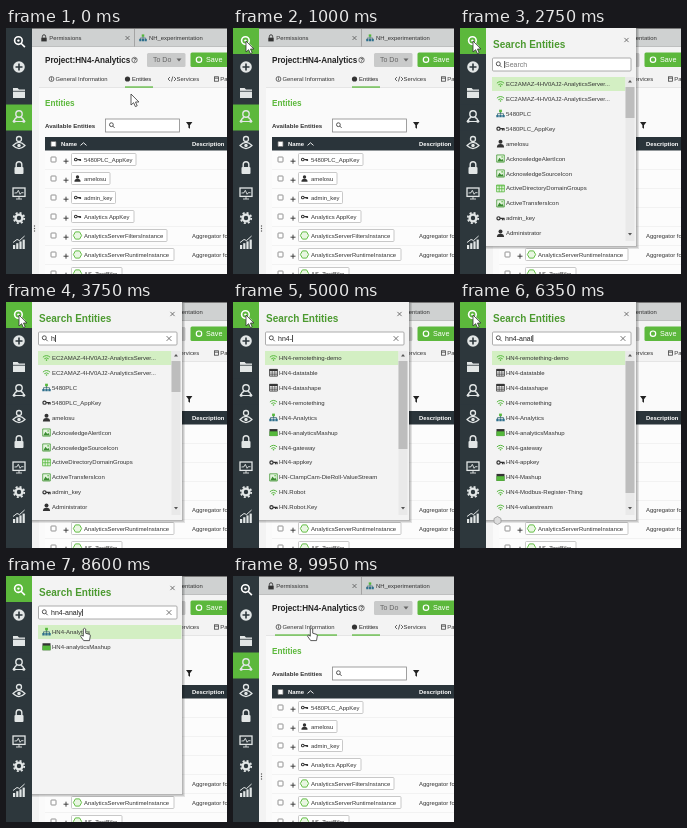
An HTML page that plays this animation: 221 by 246 pixels, repeating every 10000 ms.

```html
<!DOCTYPE html>
<html lang="en">
<head>
<meta charset="utf-8">
<title>Search entities</title>
<style>
html, body { margin: 0; width: 100%; height: 100%; overflow: hidden; background: #f3f3f3; }
svg { display: block; width: 100vw; height: 100vh; }
text { font-family: "Liberation Sans", Arial, sans-serif; font-size: 5.9px; fill: #333; white-space: pre; }
.b { font-weight: bold; }
</style>
</head>
<body>
<svg id="stage" viewBox="0 0 221 246">
  <defs>
    <g id="wifi" fill="none" stroke="#55b83c" stroke-width="1">
      <path d="M-3.6-.6Q0-3.8 3.6-.6M-2.2 1Q0-.8 2.2 1"/><circle cy="2.3" r=".8" fill="#55b83c" stroke="none"/>
    </g>
    <g id="tree">
      <path d="M0-2V1M-3 2V0H3V2" fill="none" stroke="#3c6a74" stroke-width=".8"/>
      <path d="M-1.4-4h2.8v2.6h-2.8z" fill="#55b83c"/>
      <path d="M-4.2 1.2h2.4v2.4h-2.4zM-1.2 1.2h2.4v2.4h-2.4zM1.8 1.2h2.4v2.4h-2.4z" fill="#2e6f8c"/>
    </g>
    <g id="key" fill="none" stroke="#333" stroke-width="1.2">
      <circle cx="-2" r="1.6"/><path d="M-.4 0H4M2 0V1.8M3.6 0V1.8"/>
    </g>
    <g id="lock">
      <path d="M-3-.4h6v4.2h-6z" fill="#333"/><path d="M-1.8-.4v-1.4a1.8 1.8 0 0 1 3.6 0v1.4" fill="none" stroke="#333"/>
    </g>
    <g id="user" fill="#333">
      <circle cy="-1.8" r="2"/><path d="M-3.6 3.8Q-3.6.4 0 .4T3.6 3.8z"/>
    </g>
    <g id="image">
      <path d="M-3.8-3.6h7.6v7.2h-7.6z" fill="#e5f4df" stroke="#479b38" stroke-width=".8"/>
      <path d="M-3.2 3L-1-.8.8 1.4 1.8.2 3.3 3z" fill="#3c8c32"/><circle cx="1.6" cy="-1.6" r=".8" fill="#55b83c"/>
    </g>
    <g id="grid" stroke="#55b83c" stroke-width=".8">
      <path d="M-3.9-3.4h7.8v6.8h-7.8z" fill="#e5f4df"/><path d="M-3.9-2.6h7.8M-3.9.3h7.8M-1.3-3v6.4M1.3-3v6.4"/>
    </g>
    <g id="table">
      <path d="M-3.9-3.4h7.8v6.8h-7.8z" fill="#fff" stroke="#333" stroke-width=".8"/>
      <path d="M-4-3.6h8v2h-8z" fill="#333"/><path d="M-3.9.3h7.8M-3.9 1.9h7.8M-1.3-2v5.4M1.3-2v5.4" stroke="#333" stroke-width=".6"/>
    </g>
    <g id="mashup">
      <path d="M-4-3.5h8v7h-8z" fill="#333"/><path d="M-4-1.2h8v4.7h-8z" fill="#55b83c"/>
    </g>
    <path id="hex" d="M-2.3-4h4.6L4.6 0 2.3 4h-4.6L-4.6 0z" fill="#e9f6e2" stroke="#62be43" stroke-width="1.1"/>
    <path id="arrow" d="M0 0V11L2.6 8.7 4.4 12.6 6.2 11.8 4.5 8H7.9z" fill="#fff" stroke="#333" stroke-width=".8"/>
    <path id="hand" d="M-1.2 0Q0-1.4 1.2 0V4.2L5.2 5.4Q6 5.8 5.8 7L5 11.6H-.8L-4 7.2Q-3.8 5.8-2.6 6.2L-1.2 7.2z" fill="#fff" stroke="#333" stroke-width=".8"/>
  </defs>
  <g id="page"></g>
  <g id="side"></g>
  <g id="panel"></g>
  <path id="spin" d="M34 216.5L37.5 214.5 41 216.5V220.5L37.5 222.5 34 220.5z" fill="#ddd" stroke="#999" stroke-width=".8"/>
  <g id="cursor"><use id="arrowCur" href="#arrow"/><use id="handCur" href="#hand"/></g>
</svg>
<script>
const LOOP = 10000, OPEN = 1300, CLOSE = 9300;
const GREEN = '#5cb83c', DEEP = '#4c9a30', DARK = '#2d373c';
const $ = id => document.getElementById(id);
const rect = (x, y, w, h, fill, more = '') => `<rect x="${x}" y="${y}" width="${w}" height="${h}" fill="${fill}" ${more}/>`;
const text = (x, y, s, more = '') => `<text x="${x}" y="${y}" ${more}>${s}</text>`;
const path = (d, stroke, w = 1, fill = 'none') => `<path d="${d}" stroke="${stroke}" stroke-width="${w}" fill="${fill}"/>`;
const dot = (x, y, r, fill) => `<circle cx="${x}" cy="${y}" r="${r}" fill="${fill}"/>`;
const ring = (x, y, r, c, w) => `<circle cx="${x}" cy="${y}" r="${r}" fill="none" stroke="${c}" stroke-width="${w}"/>`;
const icon = (id, x, y, s = 1) => `<use href="#${id}" transform="translate(${x} ${y}) scale(${s})"/>`;
const lens = (x, y, r, c, w) => ring(x, y, r, c, w) + path(`M${x + r * .7} ${y + r * .7}l${r} ${r}`, c, w);
const cross = (x, y, r, c = '#555') => path(`M${x - r} ${y - r}l${2 * r} ${2 * r}M${x + r} ${y - r}l${-2 * r} ${2 * r}`, c, .8);
const box = (x, y) => rect(x - 2.5, y - 2.5, 5, 5, '#fff', 'stroke="#777" stroke-width=".8" rx=".6"');

function drawPage() {
  let s = rect(26, 0, 195, 246, '#f3f3f3') + rect(33, 59, 188, 187, '#fafafa');
  s += [198, 200.5, 203].map(y => dot(28.5, y, .7, '#555')).join('');
  // document tabs
  s += rect(26, 0, 195, 19, '#cfd1d1') + rect(26, 0, 195, 1, '#777') + rect(128, 1, .8, 18, '#999') + rect(26, 18.4, 195, .6, '#b5b5b5');
  s += icon('lock', 38, 10, .9) + text(43.3, 12.3, 'Permissions') + cross(121.5, 10, 2);
  s += icon('tree', 137, 10, .9) + text(143, 12.3, 'NH_experimentation');
  // title and buttons
  s += text(39, 34.5, 'Project:HN4-Analytics', 'class="b" style="font-size:8.15px;fill:#222"');
  s += ring(128.5, 32, 2.7, '#555', .8) + text(127.2, 33.8, '?', 'class="b" style="font-size:4.6px"');
  s += rect(141, 25, 38.5, 14, '#c9caca', 'rx="1.5"') + text(147, 34.4, 'To Do', 'style="font-size:7px;fill:#666"') + path('M170.5 30.5h5l-2.5 3z', 'none', 0, '#666');
  s += rect(184.5, 24.5, 42, 14.5, GREEN, 'rx="1.5"') + ring(193, 31.7, 2.7, '#fff', 1.2) + text(200, 34.2, 'Save', 'style="font-size:7.2px;fill:#fff"');
  // section links
  s += ring(45.5, 51, 2.4, '#444', .8) + path('M45.5 50.3v2.1M45.5 49.2v.7', '#444', .8) + text(49.5, 53.2, 'General Information');
  s += dot(121.5, 51, 2.6, '#333') + text(126, 53.2, 'Entities', 'style="fill:#222"');
  s += path('M164 49l-2 2 2 2M168 49l2 2-2 2M166.8 48.5l-1.4 5', '#444', .8) + text(170.5, 53.2, 'Services');
  s += rect(208.5, 48.8, 4, 4.4, 'none', 'stroke="#444" stroke-width=".8"') + path('M208.5 50.2h4', '#444', .8) + text(214.3, 53.2, 'Parameters');
  s += rect(33, 59, 188, .7, '#ddd') + rect(119, 58.4, 28, 1.3, GREEN) + rect(42, 58.4, 62, 1.3, GREEN, 'id="hoverLine"');
  // entity table
  s += text(39, 78, 'Entities', `class="b" style="font-size:8.2px;fill:${GREEN}"`);
  s += text(39, 100, 'Available Entities', 'class="b" style="font-size:6.1px"');
  s += rect(99.5, 91, 74, 13, '#fff', 'stroke="#888" stroke-width=".8"') + lens(105.4, 96.7, 1.9, '#444', .9);
  s += path('M180 94h6.4l-2.4 3.2v3.6l-1.6-1v-2.6z', 'none', 0, '#222');
  s += rect(39, 109, 182, 14, '#2a343a') + box(47.5, 116) + text(55, 118.3, 'Name', 'class="b" style="fill:#fff"') +
    path('M74.5 117.4l3-2.6 3 2.6', '#fff', .9) + text(186, 118.3, 'Description', 'class="b" style="fill:#fff"');
  const rows = [['key', '5480PLC_AppKey', 130], ['user', 'amelosu', 104], ['key', 'admin_key', 109.5], ['key', 'Analytics AppKey', 128],
    ['hex', 'AnalyticsServerFiltersInstance', 161], ['hex', 'AnalyticsServerRuntimeInstance', 168], ['hex', 'AS_TestBike', 116]];
  rows.forEach(([kind, name, right], i) => {
    const y = 131.5 + 19 * i;
    s += rect(39, y - 9, 182, 19, '#fcfcfc') + rect(39, y + 9.6, 182, .6, '#ddd') + box(47.5, y);
    s += path(`M57.5 ${y + 1.7}h5M60 ${y - .8}v5`, '#333', .9);
    s += rect(65.5, y - 6, right - 65.5, 12, '#fff', 'stroke="#bbb" stroke-width=".8" rx="1"') + icon(kind, 71.5, y, kind == 'hex' ? .9 : .85);
    s += text(78, y + 2, name);
    if (i == 4 || i == 5) s += text(186, y + 2, 'Aggregator for');
  });
  return s;
}

function drawSide() {
  const w = '#e2e6e6';
  let s = rect(0, 0, 26, 246, DARK) + '<rect id="searchTile" width="26" height="26"/><rect id="homeTile" y="76.5" width="26" height="26"/>';
  s += lens(12.4, 12.6, 3.8, '#fff', 1.6) + dot(12.4, 12.6, 1.2, '#fff');
  s += dot(13, 39, 5.8, w) + path('M13 35.5v7M9.5 39h7', DARK, 1.6);
  s += path('M7 60h4.6l1.4 1.5h6v8.5h-12z', 'none', 0, w) + path('M7 63.3h12', DARK, .8);
  s += ring(13, 86, 3.2, w, 1.4) + path('M8 93.5Q8.5 90 11.2 89.4M18 93.5Q17.5 90 14.8 89.4M9 93.5h8', w, 1.2) +
    dot(8.2, 93.3, 1.5, w) + dot(17.8, 93.3, 1.5, w);
  s += ring(13, 111, 2.5, w, 1.3) + path('M7 117.5Q13 111.5 19 117.5 13 123.5 7 117.5z', w, 1.2) + dot(13, 117.5, 1.7, w);
  s += rect(8.5, 139, 9, 7, w, 'rx="1"') + path('M10.2 139v-2.4a2.8 2.8 0 0 1 5.6 0V139', w, 1.4);
  s += rect(7, 160, 12, 8.4, 'none', `stroke="${w}" stroke-width="1.3"`) + path('M8.5 165l2.5-.2 1.3-2.5 1.8 4 1.2-1.6h2.2M10 171h6M13 168v3', w, .9);
  s += ring(13, 190, 3.4, w, 2.4) + `<circle cx="13" cy="190" r="5.2" fill="none" stroke="${w}" stroke-width="1.8" stroke-dasharray="2.04 2.04"/>`;
  s += [0, 1, 2, 3].map(i => rect(7 + 3.2 * i, 217 - 1.8 * i, 2.2, 4 + 1.8 * i, w)).join('') + path('M7 214.5l4-3 2.6 1 5-4.5', w, 1);
  return s;
}

const lists = [
  [['wifi', 'EC2AMAZ-4HV0AJ2-AnalyticsServer...'], ['wifi', 'EC2AMAZ-4HV0AJ2-AnalyticsServer...'], ['tree', '5480PLC'],
   ['key', '5480PLC_AppKey'], ['user', 'amelosu'], ['image', 'AcknowledgeAlertIcon'], ['image', 'AcknowledgeSourceIcon'],
   ['grid', 'ActiveDirectoryDomainGroups'], ['image', 'ActiveTransfersIcon'], ['key', 'admin_key'], ['user', 'Administrator']],
  [['wifi', 'HN4-remotething-demo'], ['table', 'HN4-datatable'], ['table', 'HN4-datashape'], ['wifi', 'HN4-remotething'],
   ['tree', 'HN4-Analytics'], ['mashup', 'HN4-analyticsMashup'], ['wifi', 'HN4-gateway'], ['key', 'HN4-appkey']]
];
lists.push([...lists[1], ['mashup', 'HN4-Mashup'], ['wifi', 'HN4-Modbus-Register-Thing'], ['wifi', 'HN4-valuestream']]);
lists[1] = [...lists[1], ['image', 'HN-ClampCam-DieRoll-ValueStream'], ['wifi', 'HN.Robot'], ['key', 'HN.Robot.Key']];
lists.push([['tree', 'HN4-Analytics'], ['mashup', 'HN4-analyticsMashup']]);
const thumbs = [31, 88, 132, 0];

function drawList(items, n) {
  let s = rect(32, 49, thumbs[n] ? 133.5 : 143.5, 14, '#d3efc3');
  items.forEach(([kind, name], i) => {
    const y = 55.8 + 14.95 * i;
    s += icon(kind, 40.5, y) + text(46, y + 2, name, 'style="font-size:6px"');
  });
  if (thumbs[n]) s += rect(165.5, 49, 9, 164, '#e9e9e9') + rect(165.5, 59, 9, thumbs[n], '#bdbdbd') +
    path('M168 54.5l2-2.5 2 2.5zM168 205l2 2.5 2-2.5z', 'none', 0, '#555');
  return `<g id="list${n}">${s}</g>`;
}

function drawPanel() {
  const shadow = [3, 2, 1].map(d => rect(26, 1, 150 + d, 217 + d, '#000', 'opacity=".1"')).join('');
  return shadow + rect(26, 0, 150, 218, '#f3f3f3') +
    text(33, 20, 'Search Entities', `class="b" style="font-size:10px;fill:${DEEP}"`) + cross(166.5, 12, 2.1) +
    rect(32.5, 30, 138.5, 13, '#fff', 'stroke="#999" stroke-width=".8" rx="1"') + lens(38.3, 35.8, 2, '#444', .9) +
    '<text id="query" x="45" y="38.8"></text><rect id="caret" y="33" width=".8" height="7" fill="#222"/>' +
    `<g id="clear">${cross(163, 36.5, 2.4)}</g>` + lists.map(drawList).join('');
}

$('page').innerHTML = drawPage();
$('side').innerHTML = drawSide();
$('panel').innerHTML = drawPanel();
$('query').style.fontSize = '7px';

const typed = 'hn4-analy';
const strokes = [3500, 4000, 4400, 4750, 5350, 5650, 5950, 6250, 7100];
// time, x, y of the pointer tip
const moves = [[0, 125, 66], [150, 125, 66], [700, 13, 13], [7700, 13, 13], [8350, 78.5, 53], [LOOP, 78.5, 53]];
const show = (id, on) => $(id).setAttribute('visibility', on ? 'inherit' : 'hidden');

function pointer(t) {
  const i = Math.max(1, moves.findIndex(m => m[0] > t));
  const [t0, x0, y0] = moves[i - 1], [t1, x1, y1] = moves[i];
  const p = (t - t0) / (t1 - t0), e = p * p * (3 - 2 * p);
  return [x0 + (x1 - x0) * e, y0 + (y1 - y0) * e];
}

let last = null;
function render(t) {
  const open = t >= OPEN && t < CLOSE;
  const [x, y] = pointer(t);
  const overSearch = x < 26 && y < 26;
  $('panel').setAttribute('visibility', open ? 'visible' : 'hidden');
  $('searchTile').setAttribute('fill', open || overSearch ? GREEN : DARK);
  $('homeTile').setAttribute('fill', open ? DARK : GREEN);
  show('hoverLine', t >= CLOSE);

  const n = strokes.filter(s => s <= t).length;
  const word = n ? typed.slice(0, n) : 'Search';
  const q = $('query');
  if (word !== last) {
    q.textContent = last = word;
    q.style.fill = n ? '#222' : '#777';
    $('caret').setAttribute('x', n ? 45.2 + q.getComputedTextLength() : 44.3);
  }
  // the caret restarts its blink at each key
  const since = t - (n ? strokes[n - 1] : OPEN);
  show('caret', since % 1000 < 550);
  show('clear', n > 0);
  const current = t < 4350 ? 0 : t < 5300 ? 1 : t < 7250 ? 2 : 3;
  lists.forEach((_, i) => show('list' + i, i === current));
  show('spin', t >= 6300 && t < 6900);

  const hand = t > 7700 && y > 49;
  show('arrowCur', !hand);
  show('handCur', hand);
  $('cursor').setAttribute('transform', `translate(${x} ${y})`);
}

const start = performance.now();
function tick() {
  render((performance.now() - start) % LOOP);
  requestAnimationFrame(tick);
}
tick();
</script>
</body>
</html>
```
